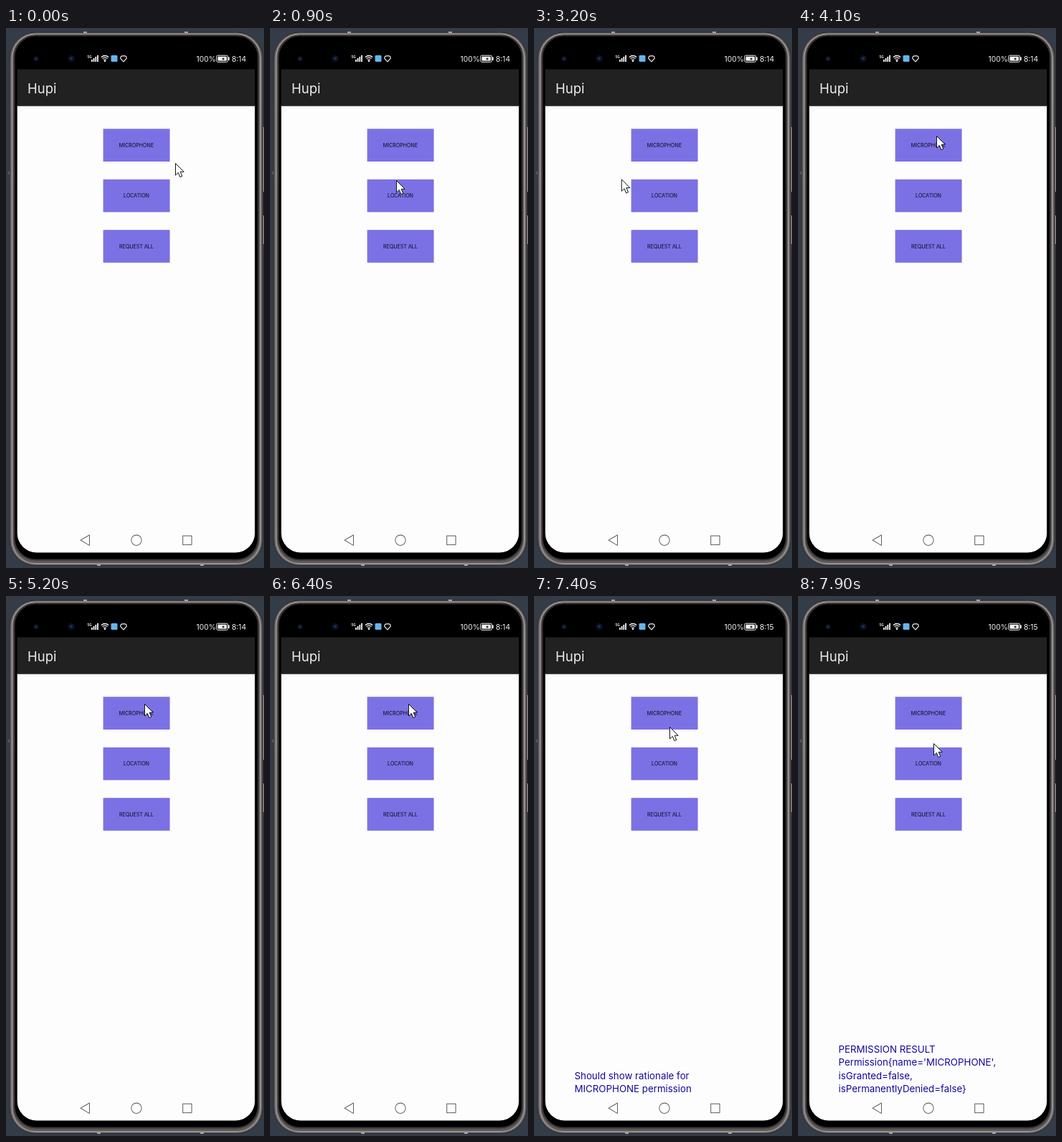
An HTML page for the animation above (8 s loop, 360 px wide and 752 px high).

```html
<!DOCTYPE html>
<html lang="en">
<head>
<meta charset="utf-8">
<title>Permission demo</title>
<style>
html, body { margin: 0; width: 100%; height: 100%; overflow: hidden; background: #343c48; }
svg { display: block; width: 100vw; height: 100vh; }
text { font-family: Inter, "Open Sans", sans-serif; }
</style>
</head>
<body>
<svg viewBox="0 0 360 752" preserveAspectRatio="none">
  <defs>
    <radialGradient id="lens">
      <stop offset="0" stop-color="#28406e"/>
      <stop offset=".4" stop-color="#0e1830"/>
      <stop offset="1" stop-color="#020306"/>
    </radialGradient>
  </defs>
  <rect width="360" height="752" fill="#343c48"/>

  <!-- phone body -->
  <path d="M358 138h2v90h-2zM358 261h2v40h-2z" fill="#b0a5a2"/>
  <path d="M358 228h2v33h-2z" fill="#25272b"/>
  <rect x="5" y="6" width="353.5" height="742.5" rx="36" fill="#5c5857" stroke="#2b2c30"/>
  <rect x="8.5" y="8.5" width="346.5" height="737.5" rx="33" fill="none" stroke="#979190" stroke-width="2"/>
  <rect x="11.5" y="10.5" width="340.5" height="730" rx="30" fill="#000" stroke="#353233" stroke-width="2"/>
  <path d="M108 6h5M249 6h5M127 748h5M271 748h5" stroke="#aaa4a2" stroke-width="2"/>
  <path d="M4 200v4" stroke="#767980"/>

  <!-- screen -->
  <path d="M15.7 57.4h331.5v51.4H15.7z" fill="#212121"/>
  <path d="M15.7 108.8h331.5v594.7a27 27 0 0 1-27 27H42.7a27 27 0 0 1-27-27z" fill="#fdfdfd"/>
  <text x="30" y="91" font-size="18.5" fill="#ececec">Hupi</text>

  <!-- status bar -->
  <circle cx="42" cy="43" r="4.5" fill="url(#lens)"/>
  <circle cx="91" cy="42.5" r="5.5" fill="url(#lens)"/>
  <g fill="#f4f4f4">
    <text x="113.5" y="42" font-size="4.5" font-weight="700">5G</text>
    <path d="M119 44h1.8v3H119zM121.7 42h1.8v5h-1.8zM124.4 40h1.8v7h-1.8zM127.1 38h1.8v9h-1.8z"/>
    <text x="265.5" y="46.5" font-size="10.3">100%</text>
    <text x="315" y="46.5" font-size="10.3" id="clock"></text>
    <circle cx="138" cy="46" r="1.2"/>
    <rect x="295.5" y="39.8" width="12.5" height="6" rx="1"/>
    <path d="M310.2 40.5h1.6v4.5h-1.6z"/>
  </g>
  <g fill="none" stroke="#f4f4f4" stroke-width="1.2">
    <path d="M132.8 40.8q5.2-4.6 10.4 0M134.5 42.7q3.5-3 7 0M136.2 44.5q1.8-1.5 3.6 0"/>
    <rect x="293.8" y="38.2" width="15.8" height="9.2" rx="2" stroke-width="1"/>
    <path d="M164 46.8l-3.6-3.6a2.7 2.7 0 0 1 1.7-4.4h3.8a2.7 2.7 0 0 1 1.7 4.4z"/>
  </g>
  <path d="M301 43.6l2.6-3.2-.3 2h2l-2.8 3.1.4-1.9z" fill="#111"/>
  <rect x="146.5" y="38" width="9" height="9" rx="1.5" fill="#63b5ea"/>

  <g id="buttons"></g>
  <g id="message" font-size="13.3" fill="#14089c"></g>

  <g fill="none" stroke="#6a6a6a" stroke-width="1.1">
    <path d="M104 713.3l12.5-7.3v14.6z" stroke-linejoin="round"/>
    <circle cx="182" cy="713.3" r="7.2"/>
    <rect x="246.7" y="707.2" width="12.4" height="12.4"/>
  </g>

  <path id="cursor" d="M.5 .5V17L4.3 13.4 6.9 19.6 9.8 18.4 7.2 12.3H12.2z" fill="#fff" stroke="#111" stroke-width="1"/>
</svg>
<script>
const LOOP = 8000, STEP = 100;
const get = id => document.getElementById(id);

get('buttons').innerHTML = ['MICROPHONE', 'LOCATION', 'REQUEST ALL'].map((label, i) => {
  const y = 140.4 + i * 70.4;
  return `<rect x="135.6" y="${y}" width="93" height="45.6" fill="#7b71e5"/>
    <text x="182" y="${y + 25.5}" font-size="7.1" text-anchor="middle" fill="#0b0a14">${label}</text>`;
}).join('');

// time, x, y of the pointer tip
const path = [
  [0, 236, 188], [900, 176, 212], [2400, 176, 212],
  [2500, -8, 400], [2800, 83, 243], [3000, 83, 243],
  [3500, 193, 150], [6900, 193, 150],
  [7400, 189, 182], [7800, 189, 198], [7900, 189, 205], [LOOP, 189, 205]
];

const messages = [
  [0, []],
  [7000, ['Should show rationale for', 'MICROPHONE permission']],
  [7600, ['PERMISSION RESULT', "Permission{name='MICROPHONE',", 'isGranted=false,', 'isPermanentlyDenied=false}']]
];

const smooth = u => u * u * (3 - 2 * u);

function pointAt(t) {
  const i = path.findIndex(p => p[0] > t);
  const [t0, x0, y0] = path[i - 1], [t1, x1, y1] = path[i];
  const u = smooth((t - t0) / (t1 - t0));
  return [x0 + (x1 - x0) * u, y0 + (y1 - y0) * u];
}

let shown;
function showMessage(lines) {
  if (lines === shown) return;
  shown = lines;
  get('message').innerHTML = lines.map((line, i) =>
    `<text x="56.5" y="${691 - (lines.length - 1 - i) * 18.3}">${line}</text>`).join('');
}

function draw(now) {
  const t = Math.floor(now % LOOP / STEP) * STEP;
  get('cursor').setAttribute('transform', `translate(${pointAt(t)})`);
  get('clock').textContent = t < 6500 ? '8:14' : '8:15';
  showMessage(messages.filter(m => m[0] <= t).pop()[1]);
}

const start = performance.now();
function tick() {
  draw(performance.now() - start);
  requestAnimationFrame(tick);
}
tick();
</script>
</body>
</html>
```
